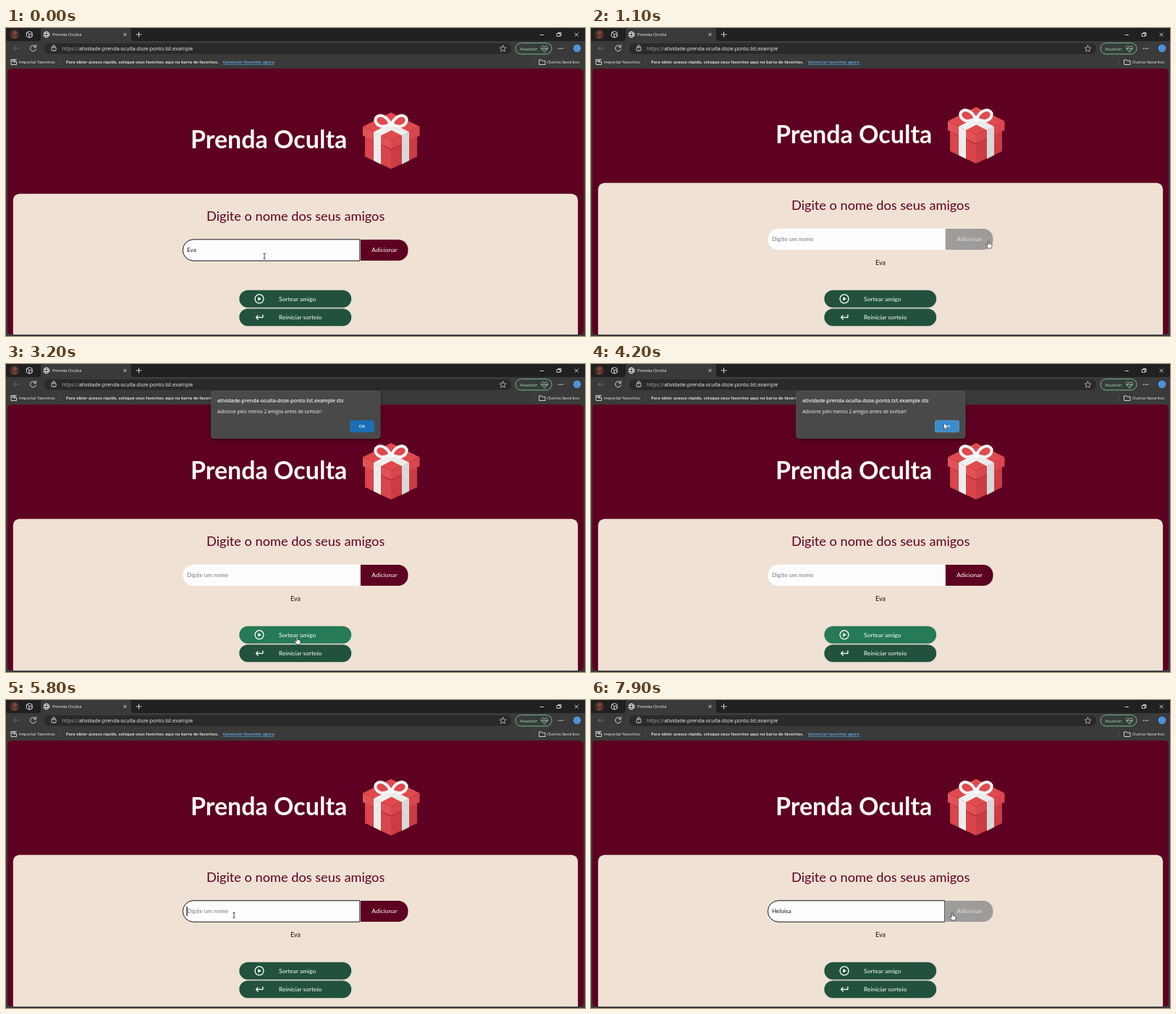
Write an HTML page that moves like this. It is 800 px wide and 425 px high and loops after 8 s.

```html
<!DOCTYPE html>
<html lang="pt-BR">
<head>
<meta charset="utf-8">
<title>Prenda Oculta</title>
<style>
html, body { margin: 0; width: 100%; height: 100%; overflow: hidden; background: #202020; }
svg { display: block; width: 800px; height: 425px; }
text { white-space: pre; }
.ui { font-family: "Open Sans", "Noto Sans", sans-serif; font-size: 5.85px; fill: #f4f4f4; }
.page { font-family: Lato, "Open Sans", sans-serif; font-size: 8.45px; }
.line { fill: none; stroke: #e4e4e4; stroke-width: .9; stroke-linecap: round; stroke-linejoin: round; }
.semi { font-weight: 600; }
</style>
</head>
<body>
<svg viewBox="0 0 800 425">
  <defs>
    <clipPath id="view"><rect x="2" y="56" width="796" height="367" rx="5"/></clipPath>
    <clipPath id="face"><circle cx="11.500" cy="8.500" r="6.500"/></clipPath>
    <filter id="soft" x="-10%" y="-20%" width="120%" height="150%">
      <feDropShadow dx="0" dy="2" stdDeviation="2.500" flood-opacity=".45"/>
    </filter>
  </defs>

  <!-- window frame -->
  <rect width="800" height="425" fill="#3a3a3a"/>
  <rect width="800" height="18" fill="#202020"/>
  <path d="M44 18q4 0 4-4V4q0-4 4-4h117q4 0 4 4v10q0 4 4 4z" fill="#3a3a3a"/>
  <g clip-path="url(#face)">
    <rect x="4" y="1" width="15" height="15" fill="#4a2c26"/>
    <circle cx="12" cy="7" r="3" fill="#7a4a3e"/>
    <ellipse cx="12" cy="15" rx="6" ry="4.500" fill="#6b3a35"/>
  </g>
  <g class="line">
    <path d="M29 6l3-1.500 4 1.500v5l-4 2.500-3.500-2zM29 6l3 2v4"/>
    <circle cx="34" cy="10.500" r="2.300" fill="#202020"/>
    <circle cx="56" cy="9" r="4"/>
    <ellipse cx="56" cy="9" rx="1.800" ry="4"/>
    <path d="M52.300 7.500h7.400M52.300 10.500h7.400"/>
    <path d="M162.700 7.200l3.600 3.600m0-3.600l-3.600 3.600M180 9h7m-3.500-3.500v7"/>
    <path d="M738 9.500h4.500M761.500 7.500h4v4h-4zM763 7.500v-1h4v4h-1.500M786 7l4.500 4.500m0-4.500l-4.500 4.500"/>
    <path d="M18 28h-8m3.500-3.500L10 28l3.500 3.500" stroke="#747474"/>
    <path d="M41 26a4 4 0 1 0 .4 3M41.300 23.500V26.300h-2.800"/>
  </g>
  <text class="ui" x="64" y="11.200" style="font-size:6.100px">Prenda Oculta</text>

  <!-- address row -->
  <rect x="52" y="20.500" width="647" height="16" rx="8" fill="#2a2a2a" stroke="#494949" stroke-width=".5"/>
  <g class="line">
    <rect x="63" y="26.500" width="6" height="5" rx="1"/>
    <path d="M64.300 26.500v-1a1.700 1.700 0 0 1 3.400 0v1M66 28.700v.5"/>
    <path d="M686.500 24l1.300 2.800 3.100.4-2.300 2.100.6 3-2.700-1.500-2.700 1.500.6-3-2.300-2.100 3.100-.4z" stroke-width=".7"/>
  </g>
  <text class="ui" x="77" y="30.800" style="font-size:7px"><tspan fill="#a6a6a6">https:</tspan><tspan fill="#a6a6a6">//</tspan>atividade-prenda-oculta-doze-ponto.tst.example</text>
  <rect x="704" y="20.700" width="50" height="15.300" rx="7.650" fill="#383b39" stroke="#7cc698" stroke-width=".9"/>
  <text class="ui" x="710" y="30.500" style="fill:#a9e3bd">Atualizar</text>
  <path class="line" style="stroke:#8fd7aa" d="M744 33l-4-4.300c-1.500-3 2.200-5.200 4-2.500 1.800-2.700 5.500-.5 4 2.500zM740 28.500h2.300l1.200-1.500 1.500 3 1-1.500h2.500"/>
  <g fill="#eee"><circle cx="763.700" cy="28.300" r=".8"/><circle cx="766.500" cy="28.300" r=".8"/><circle cx="769.300" cy="28.300" r=".8"/></g>
  <circle cx="789" cy="28" r="5.300" fill="#4b93dc"/>

  <!-- bookmarks row -->
  <path class="line" d="M13 43.500h-6v7h7.500v-4M7 45.500h4M14.500 43l-3.500 4m0-2.500V47h2.500"/>
  <path class="line" d="M737 44h3l1 1.300h4v5.200h-8z"/>
  <path d="M75.500 42.500v9M729.500 42.500v9" stroke="#555" stroke-width=".7"/>
  <g class="ui">
    <text x="18" y="49">Importar favoritos</text>
    <text class="semi" x="83" y="49" style="font-size:5.800px">Para obter acesso rápido, coloque seus favoritos aqui na barra de favoritos.</text>
    <text class="semi" x="299.500" y="49" style="font-size:5.800px;fill:#62b0f2" text-decoration="underline">Gerenciar favoritos agora</text>
    <text x="748" y="49">Outros favoritos</text>
  </g>

  <!-- page -->
  <g class="page" clip-path="url(#view)">
    <rect x="2" y="56" width="796" height="367" fill="#5d0021"/>
    <g id="head">
      <text x="255" y="158.500" font-size="34" font-weight="700" fill="#fffaf5">Prenda Oculta</text>
      <path d="M496 135l36 17v35l-36-17z" fill="#d8454a"/>
      <path d="M568 135l-36 17v35l36-17z" fill="#cb3c43"/>
      <path d="M496 141l36 18 36-18v1.500l-36 19-36-19z" fill="#b9343c"/>
      <path d="M493 128.500l39 19v11.500l-39-18z" fill="#e25257"/>
      <path d="M571.500 128.500l-39.500 19v11.500l39.500-18z" fill="#d8474d"/>
      <path d="M532 109l39.500 19.500-39.500 19-39-19z" fill="#e04a4f"/>
      <path d="M508 136l10 5v39.500l-10-5z" fill="#ececec"/>
      <path d="M557 136l-10 5v39.500l10-5z" fill="#d8d8d8"/>
      <path d="M508 136l28-14.500 10 5-28 14.500z" fill="#f1f1f1"/>
      <path d="M557 136l-28-14.500-10 5 28 14.500z" fill="#ebebeb"/>
      <g fill="#e04a4f" stroke="#f4f4f4" stroke-width="4" stroke-linejoin="round">
        <path d="M531 125c-3-8-11-14-17-11-7 4-3 12 4 14 5 1 10-1 13-3z"/>
        <path d="M533 125c3-8 11-14 17-11 7 4 3 12-4 14-5 1-10-1-13-3z"/>
      </g>
      <ellipse cx="532" cy="125" rx="4.500" ry="4" fill="#fff"/>
    </g>

    <g id="form">
      <rect x="9.800" y="213.700" width="780.400" height="240" rx="9" fill="#efe1d3"/>
      <text x="277" y="250.500" font-size="18.200" fill="#5d0021">Digite o nome dos seus amigos</text>
      <path id="field" d="M488.800 276.800v29.400H259a14.700 14.700 0 0 1 0-29.400z" fill="#fdfdfd" stroke-linejoin="round"/>
      <text id="entry" x="250" y="294.300" font-size="8.200"></text>
      <rect id="caret" y="285" width="1.200" height="13" fill="#111"/>
      <path id="add" d="M490 277h52a13.500 13.500 0 0 1 13.500 13.500v2a13.500 13.500 0 0 1-13.500 13.500h-52z"/>
      <text id="addText" x="505.300" y="294.300">Adicionar</text>
    </g>
    <text id="list" x="400" y="327.200" font-size="9" fill="#1c1414" text-anchor="middle">Eva</text>

    <rect id="draw" x="322.300" y="361.700" width="154.900" height="24" rx="12"/>
    <rect x="322.300" y="387.200" width="154.900" height="24" rx="12" fill="#22523e"/>
    <g fill="#fff">
      <text x="377" y="376.500">Sortear amigo</text>
      <text x="377" y="401.900">Reiniciar sorteio</text>
      <path d="M348.300 370.900l4.500 2.800-4.500 2.800z"/>
    </g>
    <g class="line" style="stroke:#fff;stroke-width:1.300">
      <circle cx="350" cy="373.700" r="6"/>
      <path d="M354.800 396v3.300h-9.300m2.600-2.700l-2.600 2.700 2.600 2.700"/>
    </g>
  </g>

  <!-- alert -->
  <g id="alert">
    <rect x="283.500" y="37.500" width="233.500" height="65" rx="4" fill="#4a4a4a" stroke="#5a5a5a" stroke-width=".6" filter="url(#soft)"/>
    <g class="ui">
      <text class="semi" x="292" y="52.600" style="font-size:7px">atividade-prenda-oculta-doze-ponto.tst.example diz</text>
      <text x="292" y="67.500" style="font-size:6.450px">Adicione pelo menos 2 amigos antes de sortear!</text>
      <rect id="ok" x="475.500" y="78" width="33" height="16" rx="2"/>
      <text class="semi" x="492" y="88.200" text-anchor="middle" style="font-size:6px">OK</text>
    </g>
  </g>

  <g id="mouse">
    <path id="beam" d="M-1.500-3.500h3M0-3.500v7M-1.500 3.500h3" fill="none" stroke="#333" stroke-width=".9"/>
    <path id="hand" d="M-1.700-4.500c0-1.200 1.700-1.200 1.700 0v3l3.200.8c.8.200 1.100.8 1 1.600l-.6 2.600-.7 1.500h-4.200l-2.800-4c-.5-.9.500-1.600 1.300-.9l1.100.9z" fill="#fff" stroke="#222" stroke-width=".7"/>
    <path id="arrow" d="M-2.500-4.500v8.500l2-1.900 1.300 3 1.500-.7-1.300-2.900h2.800z" fill="#fff" stroke="#222" stroke-width=".6"/>
  </g>
</svg>
<script>
const LOOP = 8000, ADDED = 1100, ALERT = 3200, CLOSED = 4400, FOCUS = 5800;
const FIRST = 'Eva', SECOND = 'Heloisa';
const keys = [6100, 6300, 6500, 6700, 6800, 6900, 7000];

// time, x, y, pointer shape
const moves = [
  [0, 357, 315, 'beam'], [200, 372, 313, 'beam'], [500, 452, 308, 'beam'],
  [600, 538, 302, 'hand'], [900, 549, 299, 'hand'], [1100, 550, 299, 'hand'],
  [1400, 546, 304, 'hand'], [1500, 518, 325, 'arrow'], [1600, 478, 345, 'arrow'],
  [2100, 468, 350, 'arrow'], [2500, 412, 377, 'hand'], [2600, 403, 382, 'hand'],
  [3500, 406, 371, 'arrow'], [3600, 416, 330, 'arrow'], [3700, 433, 270, 'arrow'],
  [3800, 452, 205, 'arrow'], [3900, 469, 150, 'arrow'], [4000, 482, 112, 'arrow'],
  [4100, 489, 92, 'arrow'], [4200, 490, 86, 'arrow'], [4500, 470, 128, 'arrow'],
  [4600, 440, 175, 'arrow'], [4800, 426, 190, 'arrow'], [5300, 402, 215, 'arrow'],
  [5500, 362, 257, 'arrow'], [5700, 322, 292, 'beam'], [5800, 315, 297, 'beam'],
  [7400, 345, 297, 'beam'], [7500, 420, 298, 'beam'], [7800, 478, 299, 'beam'],
  [7900, 500, 299, 'hand']
];

const $ = id => document.getElementById(id);
const set = (id, attrs) => {
  for (const name in attrs) $(id).setAttribute(name, attrs[name]);
};
const show = (id, on) => set(id, { visibility: on ? 'visible' : 'hidden' });
const within = (t, from, to) => t >= from && t < to;

function render(t) {
  const [, x, y, shape] = moves.filter(m => m[0] <= t).pop();
  const before = t < ADDED;
  const focused = before || t >= FOCUS;
  const typed = before ? FIRST : SECOND.slice(0, keys.filter(k => k <= t).length);
  const overAdd = shape === 'hand' && y < 320;
  const overOk = within(t, 4100, CLOSED);

  set('head', { transform: `translate(0 ${before ? 7.5 : 0})` });
  set('form', { transform: `translate(0 ${before ? 15 : 0})` });
  show('list', !before);

  set('field', { stroke: focused ? '#10121c' : '#f3ece5', 'stroke-width': focused ? 1 : .6 });
  $('entry').textContent = typed || 'Digite um nome';
  set('entry', { fill: typed ? '#111' : '#777' });
  set('caret', { x: 249.4 + (typed ? $('entry').getComputedTextLength() + .6 : 0) });
  show('caret', within(t, FOCUS, 7500));

  set('add', { fill: overAdd ? '#9e9c9b' : '#5d0021' });
  set('addText', { fill: overAdd ? '#e9ded3' : '#fff' });
  set('draw', { fill: within(t, 2500, 4500) ? '#267a56' : '#22523e' });

  show('alert', within(t, ALERT, CLOSED));
  set('ok', { fill: overOk ? '#3a8bcc' : '#1a6fb8', stroke: overOk ? '#6fb0e2' : '#1a6fb8', 'stroke-width': .6 });

  set('mouse', { transform: `translate(${x} ${y})` });
  for (const id of ['beam', 'hand', 'arrow']) show(id, id === shape);
}

const start = performance.now();
function tick() {
  render((performance.now() - start) % LOOP);
  requestAnimationFrame(tick);
}
tick();
</script>
</body>
</html>
```
